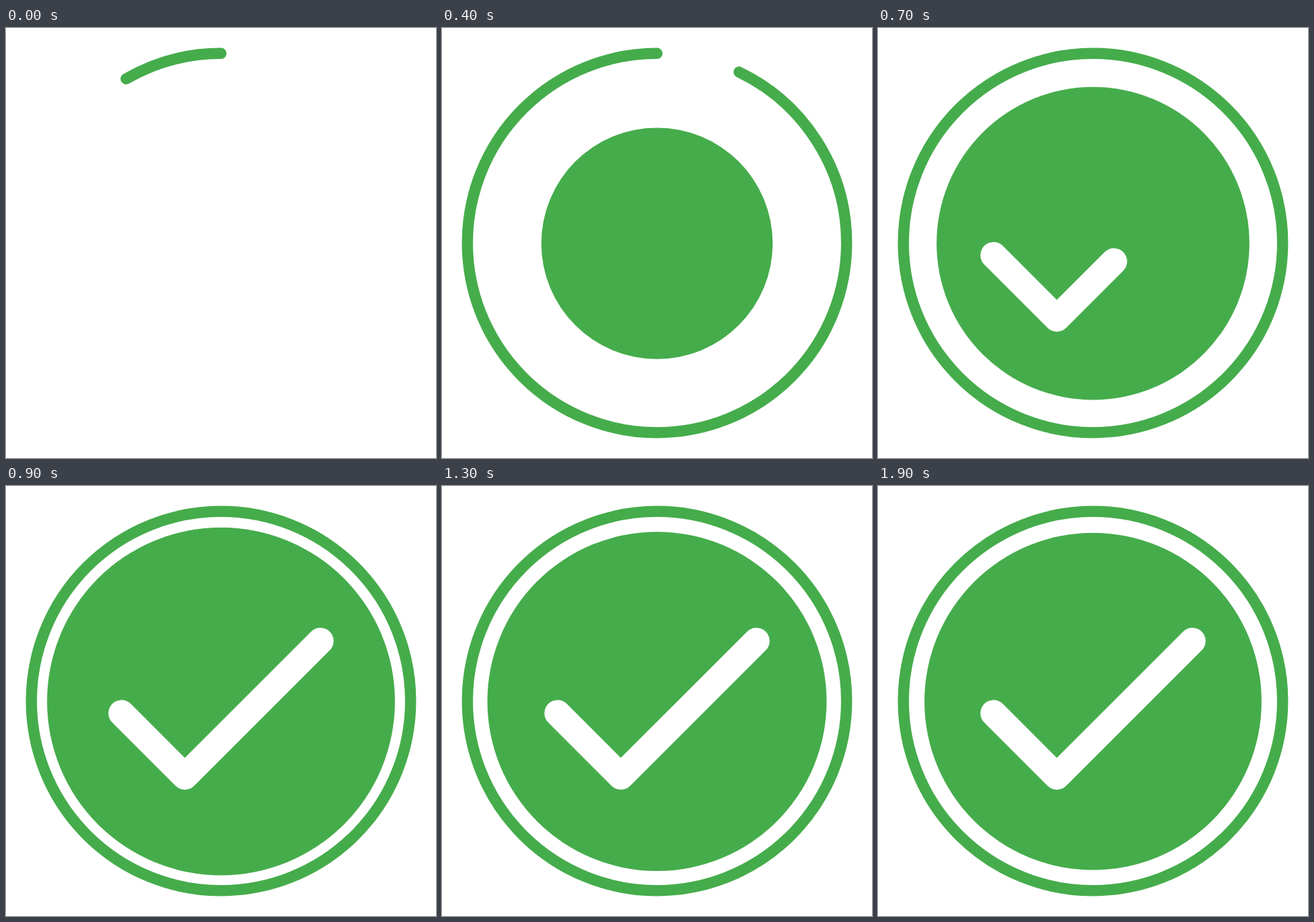
Recreate the animation shown at these times as an HTML page. Size 640x640 px, loop 2 s.

```html
<!DOCTYPE html>
<html lang="en">
<head>
<meta charset="utf-8">
<title>Success check</title>
<style>
  html, body { margin: 0; width: 100%; height: 100%; overflow: hidden; background: #fff; }
  svg { display: block; width: 100%; height: 100%; }
  path { fill: none; stroke-linecap: round; stroke-linejoin: round; }
</style>
</head>
<body>
<svg viewBox="0 0 640 640">
  <path id="ring" d="M320 37.8A282.2 282.2 0 0 0 320 602.2A282.2 282.2 0 0 0 320 37.8" stroke="#45ac4b" stroke-width="16.5"/>
  <circle id="disc" cx="320" cy="320.6" fill="#45ac4b"/>
  <path id="check" d="M172 338.2L266.2 432.3L468 230.7" stroke="#fff" stroke-width="39.2"/>
</svg>
<script>
const LOOP = 2000, STEP = 100;
const RADIUS = 251, GROW_START = 287.5, GROW_END = 451.5;
const [ring, disc, check] = ['ring', 'disc', 'check'].map(id => document.getElementById(id));

const progress = (t, from, to) => Math.min(1, Math.max(0, (t - from) / (to - from)));

// Reveal the first part p (0..1) of a path.
function trim(path, p) {
  const len = path.getTotalLength();
  path.style.display = p > 0 ? '' : 'none';
  path.setAttribute('stroke-dasharray', p < 1 ? `${p * len} ${2 * len}` : 'none');
}

// Linear growth followed by a damped oscillation.
function discRadius(t) {
  const s = (t - GROW_END) / 1000;
  if (s < 0) return RADIUS * progress(t, GROW_START, GROW_END);
  return RADIUS + 74.9 * Math.sin(5 * Math.PI * s) * Math.exp(-4.2 * s);
}

function draw(t) {
  trim(ring, progress(t, -39.5, 434));
  disc.setAttribute('r', discRadius(t));
  trim(check, progress(t, GROW_END, 862));
}

const start = performance.now();
function tick() {
  const t = (performance.now() - start) % LOOP;
  draw(Math.floor(t / STEP) * STEP);
  requestAnimationFrame(tick);
}
tick();
</script>
</body>
</html>
```
